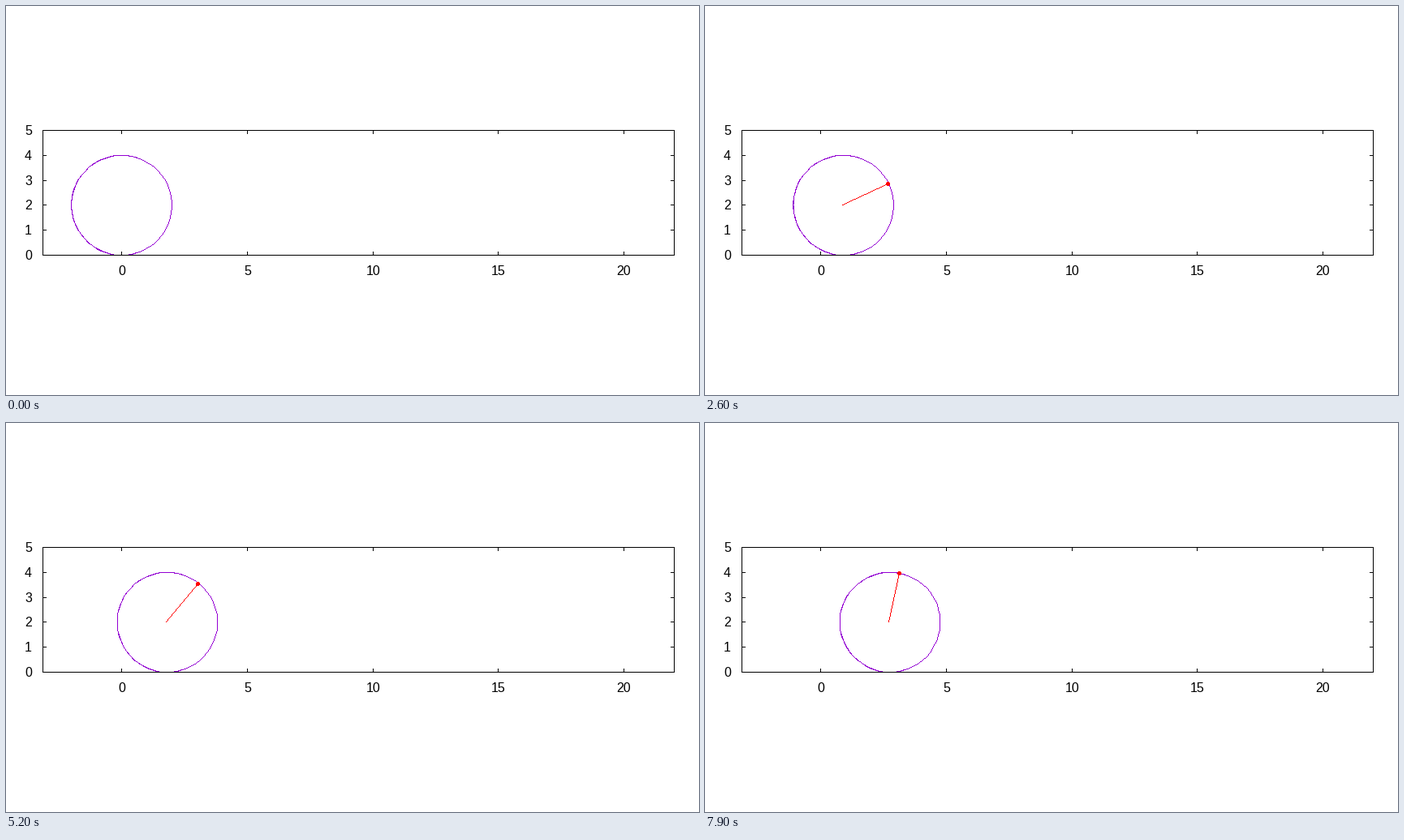
These frames come from a looping animation (854x480 px, 8 s). A matplotlib script:

```python
import numpy as np
import matplotlib.pyplot as plt
from matplotlib.animation import FuncAnimation
from matplotlib.collections import PolyCollection

W, H, DPI = 854, 480, 64
LEFT, RIGHT, TOP, BOTTOM = 45, 823, 153, 307
X_MIN, X_MAX, Y_MAX = -np.pi, 22, 5
R = 2
TIC = 4
FRAMES, INTERVAL = 80, 100

fig = plt.figure(figsize=(W / DPI, H / DPI), dpi=DPI, facecolor="white")
ax = fig.add_axes([0, 0, 1, 1])
ax.set_xlim(0, W)
ax.set_ylim(H, 0)
ax.axis("off")


def to_px(x, y):
    """Map plot units to whole pixels (column, row)."""
    col = LEFT + (np.asarray(x, float) - X_MIN) * (RIGHT - LEFT) / (X_MAX - X_MIN)
    row = BOTTOM - np.asarray(y, float) * (BOTTOM - TOP) / Y_MAX
    return np.stack([np.floor(col + 0.5), np.ceil(row - 0.5)], axis=-1)


def line(p, q):
    """Pixels of a one pixel wide line without smoothing."""
    p, q = np.asarray(p, float), np.asarray(q, float)
    major = 0 if abs(q[0] - p[0]) >= abs(q[1] - p[1]) else 1
    if p[major] > q[major]:
        p, q = q, p
    d = q - p
    n = int(abs(d[major]))
    k = np.arange(n + 1)[:, None]
    return p + np.sign(d) * np.floor(k * np.abs(d) / max(n, 1) + 0.5)


def polyline(pts):
    return np.vstack([line(p, q) for p, q in zip(pts[:-1], pts[1:])])


UNIT = np.array([[0, 0], [1, 0], [1, 1], [0, 1]])


def squares(pixels):
    return np.unique(pixels, axis=0)[:, None, :] + UNIT


def layer(color, z):
    return ax.add_collection(
        PolyCollection([], facecolors=color, linewidths=0, antialiaseds=False, zorder=z),
        autolim=False)


def label(x, y, s, ha):
    ax.text(x, y, s, ha=ha, va="baseline", color="black",
            family="Liberation Sans", size=16 * 72 / DPI)


# Frame, tics and labels
frame = [polyline([(LEFT, TOP), (RIGHT, TOP), (RIGHT, BOTTOM),
                   (LEFT, BOTTOM), (LEFT, TOP)])]
for x in range(0, 21, 5):
    col = to_px(x, 0)[0]
    frame += [line((col, TOP), (col, TOP + TIC)),
              line((col, BOTTOM), (col, BOTTOM - TIC))]
    label(col + 0.5, 332, str(x), "center")
for y in range(6):
    row = to_px(0, y)[1]
    frame += [line((LEFT, row), (LEFT + TIC, row)),
              line((RIGHT, row), (RIGHT - TIC, row))]
    label(32, row + 6, str(y), "right")

wheel = layer("#9400d3", 1)
spoke = layer("#ff0000", 2)
border = layer("black", 3)
border.set_verts(squares(np.vstack(frame)))

# The parameter range overlaps itself on the left half of the wheel
t = np.linspace(-5, 5, 100)
dot = np.array([(i, j) for i in range(-2, 3) for j in range(-2, 3)
                if abs(i) + abs(j) < 4])


def draw(n):
    a = np.radians(n)
    wheel.set_verts(squares(polyline(
        to_px(R * a + R * np.cos(t), R + R * np.sin(t)))))
    if n == 0:
        spoke.set_verts([])
    else:
        # The spoke trails the wheel by one step
        b = np.radians(n - 1)
        hub = to_px(R * b, R)
        tip = to_px(R * b + R * np.cos(b), R + R * np.sin(b))
        spoke.set_verts(squares(np.vstack([line(hub, tip), tip + dot])))
    return wheel, spoke


anim = FuncAnimation(fig, draw, frames=FRAMES, interval=INTERVAL,
                     repeat=True, repeat_delay=0, blit=False)
plt.show()
```
